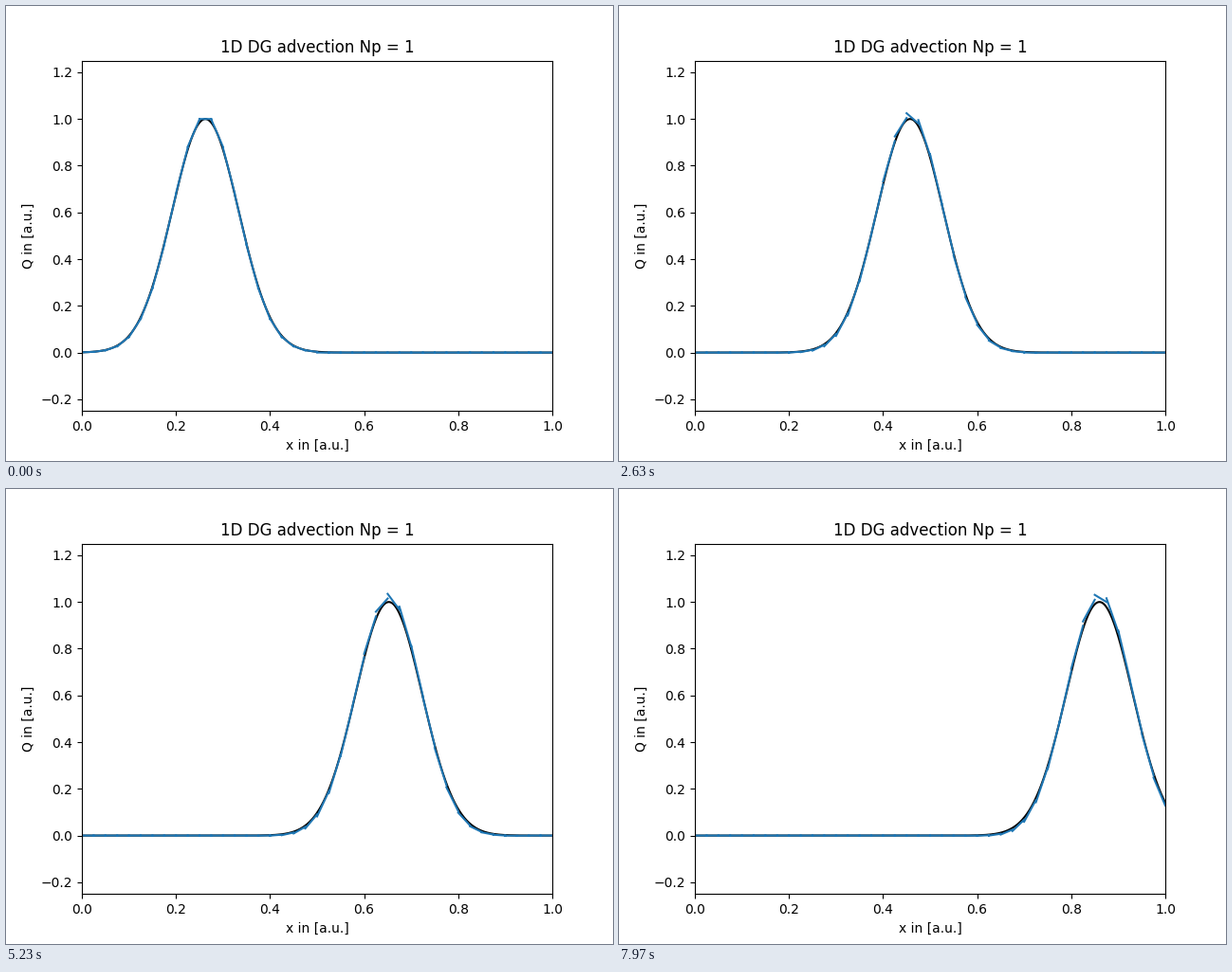
A matplotlib script for the animation above (8000 ms loop, 640 px wide and 480 px high).

```python
import numpy as np
import matplotlib.pyplot as plt
from matplotlib.animation import FuncAnimation

FRAMES = 240
LOOP_MS = 8000
CELLS = 40
H = 1 / CELLS
DT = 0.0005
STEPS = 5            # solver steps per frame
X0 = 0.2625
WIDTH = 0.1


def pulse(x, center):
    return np.exp(-((x - center) / WIDTH) ** 2)


def advance(mean, slope):
    """One forward Euler step of linear upwind DG with zero inflow."""
    right = mean + slope
    left = np.concatenate(([0.0], right[:-1]))
    new_mean = mean - DT / H * (right - left)
    new_slope = slope + 3 * DT / H * (2 * mean - right - left)
    return new_mean, new_slope


def solve():
    xc = (np.arange(CELLS) + 0.5) * H
    mean = np.where(xc < 0.5, pulse(xc, X0), 0.0)
    slope = -2 * (xc - X0) / WIDTH**2 * mean * H / 2
    states = []
    for _ in range(FRAMES):
        states.append((mean, slope))
        for _ in range(STEPS):
            mean, slope = advance(mean, slope)
    return states


def broken(left, right):
    """Join cell end values into one array with a gap after each cell."""
    return np.column_stack((left, right, np.full(CELLS, np.nan))).ravel()


states = solve()
edges = np.linspace(0, 1, CELLS + 1)
cell_x = broken(edges[:-1], edges[1:])
fine_x = np.linspace(0, 1, 1001)

fig, ax = plt.subplots(figsize=(6.4, 4.8), dpi=100)
ax.set_xlim(0, 1)
ax.set_ylim(-0.25, 1.25)
ax.set_title("1D DG advection Np = 1")
ax.set_xlabel("x in [a.u.]")
ax.set_ylabel("Q in [a.u.]")
exact, = ax.plot(fine_x, pulse(fine_x, X0), color="black")
approx, = ax.plot(cell_x, np.zeros_like(cell_x), color="C0")


def update(i):
    mean, slope = states[i]
    exact.set_ydata(pulse(fine_x, X0 + i * STEPS * DT))
    approx.set_ydata(broken(mean - slope, mean + slope))
    return exact, approx


def init():
    return update(0)


anim = FuncAnimation(fig, update, frames=FRAMES, init_func=init,
                     interval=LOOP_MS / FRAMES, repeat=True, repeat_delay=0)
plt.show()
```
